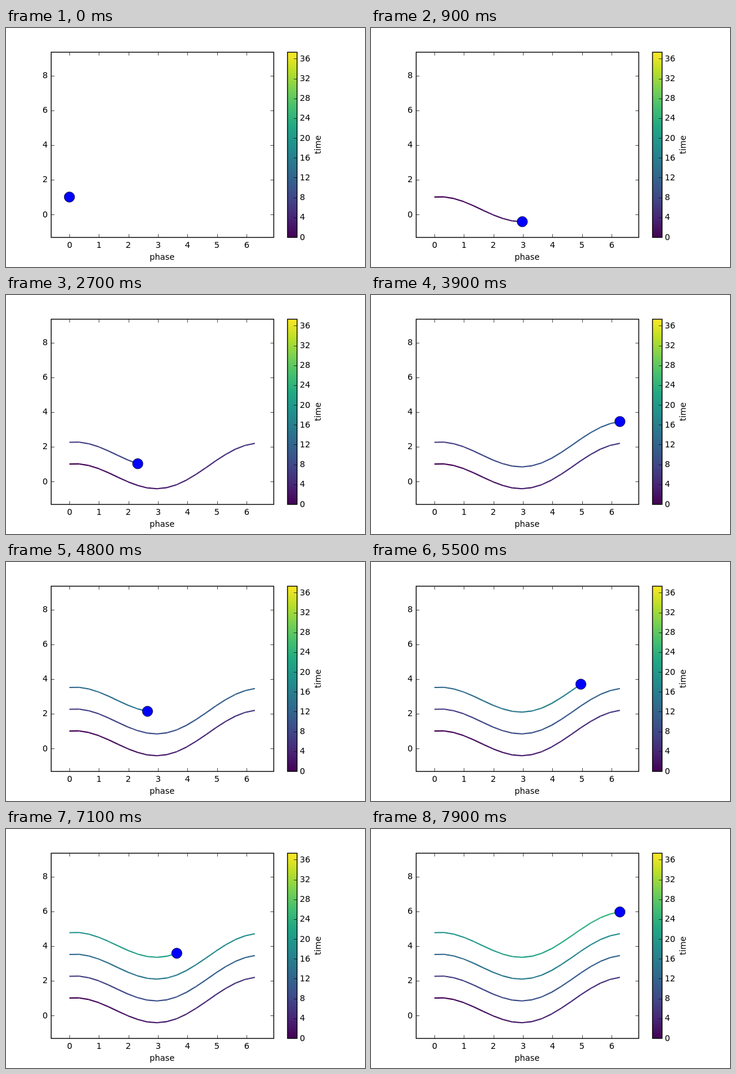
An HTML page for the animation above (8000 ms loop, 600 px wide and 400 px high).

```html
<!DOCTYPE html>
<html lang="en">
<head>
<meta charset="utf-8">
<title>Phase plot</title>
<style>
  html, body { margin: 0; width: 100%; height: 100%; overflow: hidden; background: #fff; }
  svg { display: block; }
  text { font: 13.89px "DejaVu Sans", Verdana, sans-serif; }
</style>
</head>
<body>
<svg id="stage" width="600" height="400" viewBox="0 0 600 400">
  <defs><linearGradient id="scale" x1="0" y1="1" x2="0" y2="0"></linearGradient></defs>
  <rect width="600" height="400" fill="#fff"/>
  <g id="curve" fill="none" stroke-width="2.08"></g>
  <circle id="dot" r="8.7" fill="#00f" stroke="#000" stroke-width=".7"/>
  <rect x="470" y="40" width="16" height="310" fill="url(#scale)"/>
  <g fill="none" stroke="#000" stroke-width="1.39">
    <rect x="75.5" y="40.5" width="372" height="310"/>
    <rect x="470.5" y="40.5" width="16" height="310"/>
  </g>
  <g id="ticks" stroke="#000" stroke-width=".69"></g>
  <g id="labels">
    <text x="240" y="388">phase</text>
    <text transform="translate(526 195.3) rotate(-90)" text-anchor="middle">time</text>
  </g>
</svg>
<script>
const STEP_MS = 100, STEPS = 80, PER_CYCLE = 20, TOTAL = 120;
const TAU = 2 * Math.PI, TICK = 5.56;
const VIRIDIS = ['440154', '482475', '414487', '355f8d', '2a788e', '21918c',
  '22a884', '44bf70', '7ad151', 'bddf26', 'fde725'];

const $ = id => document.getElementById(id);
function add(parent, tag, attrs, text) {
  const el = document.createElementNS('http://www.w3.org/2000/svg', tag);
  for (const key in attrs) el.setAttribute(key, attrs[key]);
  if (text !== undefined) el.textContent = text;
  return parent.appendChild(el);
}

const timeAt = k => k * TAU / PER_CYCLE;
const phaseAt = k => (k % PER_CYCLE) * TAU / (PER_CYCLE - 1);
const valueAt = k => Math.cos(phaseAt(k)) + 0.2 * timeAt(k);
const END = timeAt(TOTAL - 1);

// Vertical limits: data range plus a margin on both sides
const values = Array.from({ length: TOTAL }, (_, k) => valueAt(k));
const low = Math.min(...values), high = Math.max(...values);
const unit = 310 / (1.2 * (high - low));
const px = phase => 106 + phase * 310 / TAU;
const py = value => 350 - (value - low + 0.1 * (high - low)) * unit;
const pt = time => 350 - 310 * time / END;

function color(f) {
  const pos = f * (VIRIDIS.length - 1);
  const i = Math.min(Math.floor(pos), VIRIDIS.length - 2);
  const mix = [0, 2, 4].map(c => {
    const [a, b] = [VIRIDIS[i], VIRIDIS[i + 1]].map(h => parseInt(h.substr(c, 2), 16));
    return Math.round(a + (b - a) * (pos - i));
  });
  return `rgb(${mix})`;
}

const snap = v => Math.round(v) + 0.5;
const hTick = (x, y, dx) => add($('ticks'), 'path', { d: `M${x} ${snap(y)}h${dx}` });
const vTick = (x, y, dy) => add($('ticks'), 'path', { d: `M${snap(x)} ${y}v${dy}` });
const label = (x, y, text) =>
  add($('labels'), 'text', { x: Math.round(x), y: Math.round(y) }, text);

VIRIDIS.forEach((hex, i) => add($('scale'), 'stop', { offset: i / 10, 'stop-color': '#' + hex }));

for (let n = 0; n <= 6; n++) {
  vTick(px(n), 350.5, -TICK);
  vTick(px(n), 40.5, TICK);
  label(px(n) - 4.42, 368, n);
}
for (let n = 0; n <= 8; n += 2) {
  hTick(75.5, py(n), TICK);
  hTick(447.5, py(n), -TICK);
  label(60.6, py(n) + 4.6, n);
}
for (let n = 0; n <= 36; n += 4) {
  hTick(486.5, pt(n), -TICK);
  label(491, pt(n) + 4.5, n);
}

// One coloured segment per step; the curve breaks between cycles
const segments = [];
for (let k = 1; k < STEPS; k++) {
  if (k % PER_CYCLE === 0) continue;
  const el = add($('curve'), 'path', {
    d: `M${px(phaseAt(k - 1))} ${py(valueAt(k - 1))}L${px(phaseAt(k))} ${py(valueAt(k))}`,
    stroke: color(timeAt(k - 1) / END)
  });
  segments.push({ k, el });
}

function draw(ms) {
  const step = Math.floor(ms / STEP_MS) % STEPS;
  for (const { k, el } of segments) el.setAttribute('display', k <= step ? 'inline' : 'none');
  $('dot').setAttribute('cx', px(phaseAt(step)));
  $('dot').setAttribute('cy', py(valueAt(step)));
}

const start = performance.now();
function tick() {
  draw(performance.now() - start);
  requestAnimationFrame(tick);
}
tick();
</script>
</body>
</html>
```
